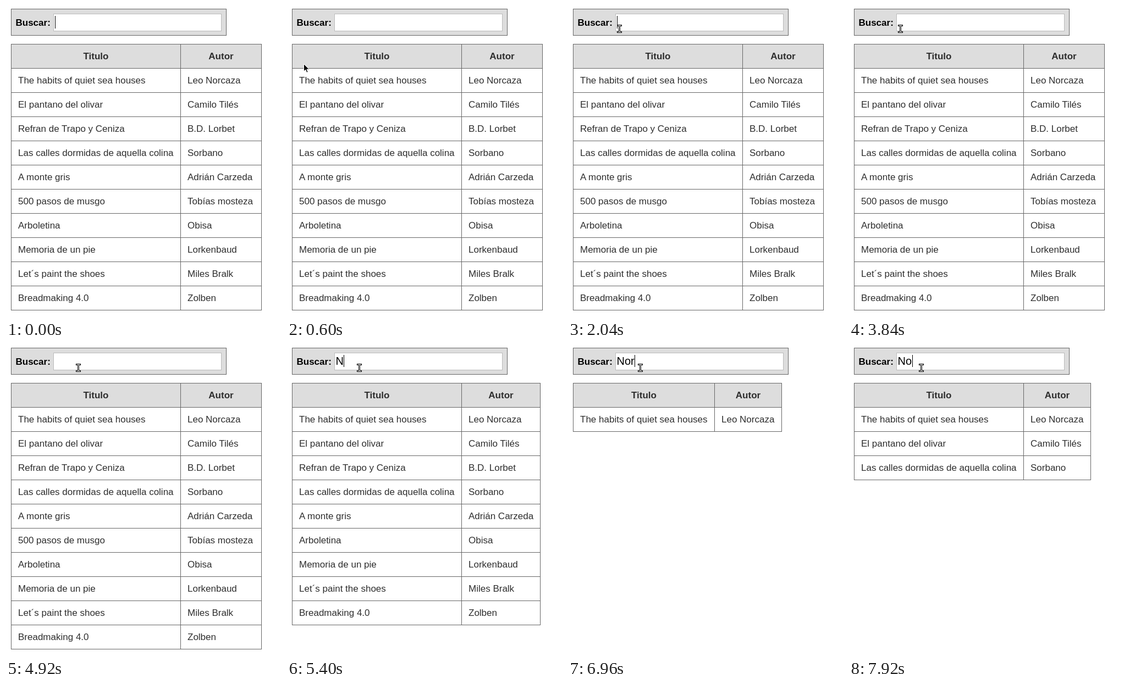
Animation, 500 px wide and 566 px high, one loop 8 s. Source, as an HTML page:

```html
<!DOCTYPE html>
<html lang="es">
<head>
<meta charset="utf-8">
<title>Buscar</title>
<style>
  html, body { margin: 0; width: 500px; height: 566px; overflow: hidden; background: #fff; }
  body { position: relative; font: 17px "Liberation Sans", Arial, sans-serif; color: #2e2e2e; }
  body > * { position: absolute; box-sizing: border-box; white-space: pre; }
  #bar { left: 9px; top: 5px; width: 392px; height: 49px; background: #ddd; border: 1px solid #666; }
  #label { left: 17.5px; top: 21px; line-height: 19px; font-weight: bold; color: #000; }
  #field { left: 86px; top: 14px; width: 306px; height: 32px; background: #fff; border: 1px solid #bbb; }
  #query { left: 88.5px; top: 18px; font-size: 20px; line-height: 22px; color: #000; }
  #caret { top: 18px; width: 1px; background: #000; }
  #table { left: 9px; top: 69px; display: grid; grid-auto-rows: 43px; gap: 1px; padding: 1px; background: #666; }
  #table div { padding-left: 12px; line-height: 43px; background: #fff; overflow: hidden; }
  #table .head { padding: 0; text-align: center; font-weight: bold; background: #ddd; }
  #pointer { left: 0; top: 0; width: 20px; height: 20px; overflow: visible; }
</style>
</head>
<body>
<div id="bar"></div>
<div id="label">Buscar:</div>
<div id="field"></div>
<div id="query"></div>
<div id="caret"></div>
<div id="table"></div>
<svg id="pointer">
  <path id="arrow" d="M.5 .5V14l3.2-3 2.2 5.2 2.3-1-2.2-5h4.4z" fill="#000" stroke="#fff"/>
  <g id="beam" fill="none">
    <path d="M-4.5-6H4.5M-4.5 6H4.5M0-6V6" stroke="#000" stroke-width="3"/>
    <path d="M-3.5-6H3.5M-3.5 6H3.5M0-6V6" stroke="#fff"/>
  </g>
</svg>
<script>
const LOOP = 8000;
const books = [
  ['The habits of quiet sea houses', 'Leo Norcaza'],
  ['El pantano del olivar', 'Camilo Tilés'],
  ['Refran de Trapo y Ceniza', 'B.D. Lorbet'],
  ['Las calles dormidas de aquella colina', 'Sorbano'],
  ['A monte gris', 'Adrián Carzeda'],
  ['500 pasos de musgo', 'Tobías mosteza'],
  ['Arboletina', 'Obisa'],
  ['Memoria de un pie', 'Lorkenbaud'],
  ['Let´s paint the shoes', 'Miles Bralk'],
  ['Breadmaking 4.0', 'Zolben'],
];
// Indexed by query length
const columns = ['307px 146px', '307px 142px', '307px 121px', '256px 121px'];
const caretX = [89, 103, 115, 121];

const typing = [[0, ''], [5400, 'N'], [6000, 'No'], [6960, 'Nor'], [7920, 'No']];
const blinks = [0, 360, 960, 1560, 2040, 2640, 3240, 3840, 4440, 4920, 5400];
const lateBlinks = [6480, 6960, 7560, 7920];
// time, x, y, kind
const moves = [
  [0, 0, 0, ''],
  [120, 104, 236, 'arrow'], [240, 70, 200, 'arrow'], [360, 38, 165, 'arrow'],
  [480, 26, 132, 'arrow'], [600, 30, 105, 'arrow'], [720, 46, 82, 'arrow'],
  [840, 66, 63, 'arrow'], [960, 80, 54, 'arrow'],
  [1080, 89.5, 45.5, 'beam'], [1200, 94.5, 43.5, 'beam'], [1320, 96.5, 42.5, 'beam'],
  [1920, 95.5, 42.5, 'beam'], [2040, 93.5, 41.5, 'beam'],
  [4200, 104.5, 42.5, 'beam'], [4320, 122.5, 41.5, 'beam'], [4440, 131.5, 41.5, 'beam'],
];

const $ = id => document.getElementById(id);
const latest = (list, t) => list.filter(step => step[0] <= t).pop();
const toggles = [...blinks, ...lateBlinks];
let shown = null;

function addCell(text, head) {
  const cell = document.createElement('div');
  cell.textContent = text;
  if (head) cell.className = 'head';
  $('table').append(cell);
}

function search(query) {
  if (query === shown) return;
  shown = query;
  const n = query.length;
  $('query').textContent = query;
  $('caret').style.left = caretX[n] + 'px';
  $('caret').style.height = (n ? 22 : 23) + 'px';
  $('table').replaceChildren();
  $('table').style.gridTemplateColumns = columns[n];
  ['Titulo', 'Autor'].forEach(text => addCell(text, true));
  books.filter(book => book.join('|').toLowerCase().includes(query.toLowerCase()))
    .flat().forEach(text => addCell(text));
}

function draw(now) {
  const t = now % LOOP;
  search(latest(typing, t)[1]);
  const passed = toggles.filter(time => time <= t).length;
  $('caret').style.visibility = passed % 2 ? 'visible' : 'hidden';
  const [, x, y, kind] = latest(moves, t);
  $('pointer').style.transform = `translate(${x}px, ${y}px)`;
  for (const id of ['arrow', 'beam']) $(id).style.display = id === kind ? '' : 'none';
}

function tick() {
  draw(performance.now());
  requestAnimationFrame(tick);
}
tick();
</script>
</body>
</html>
```
